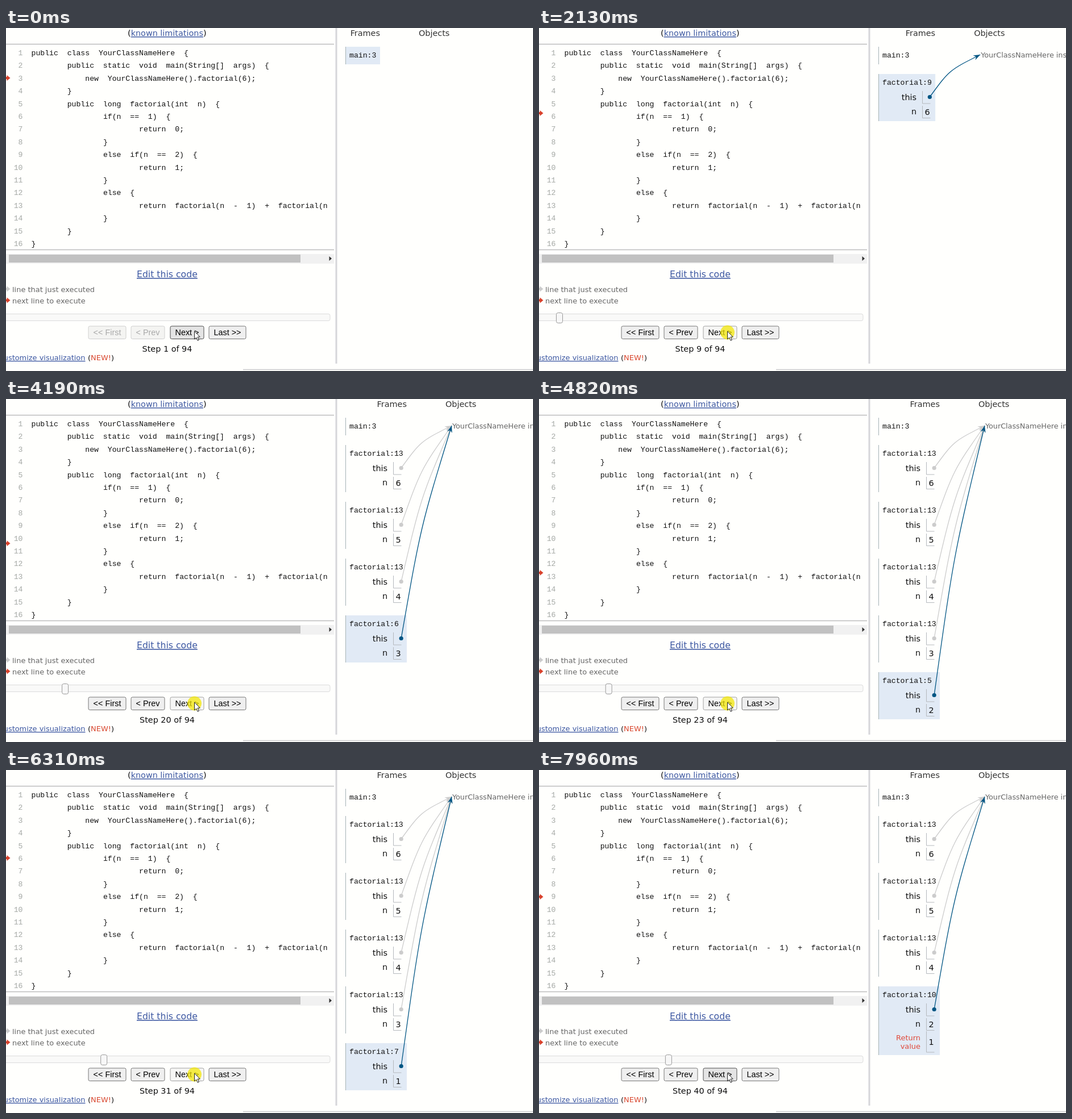
An HTML page for the animation above (8 s loop, 927 px wide and 604 px high).

```html
<!DOCTYPE html>
<html lang="en">
<head>
<meta charset="utf-8">
<title>Stepping through a recursive call</title>
<style>
  html, body { margin: 0; height: 100%; overflow: hidden; background: #fffffd; }
  svg { display: block; }
  text { font: 14.4px "DejaVu Sans", sans-serif; fill: #111; }
  .small { font-size: 12.95px; }
  .grey { fill: #666; }
  .head { fill: #333; }
  .link { fill: #3d58a2; text-decoration: underline; }
  .red { fill: #d9482f; }
  .ret { font-size: 12.95px; fill: #e04a3c; }
  .mono { font: 13.17px "Liberation Mono", monospace; }
  .num { fill: #a5a9a5; }
  .btn rect { fill: #efefef; stroke: #767676; }
  .btn text { font: 14.4px "Liberation Sans", sans-serif; fill: #000; }
  .off rect { fill: #f4f4f2; stroke: #cfcfcf; }
  .off text { fill: #a9a9a9; }
  .hover rect { fill: #e4e4e4; stroke: #4c4c4c; }
  .down rect { fill: #f6f6f5; stroke: #a0a0a0; }
  .end { text-anchor: end; }
  .mid { text-anchor: middle; }
</style>
</head>
<body>
<svg width="927" height="604" viewBox="0 0 927 604">
  <defs><path id="arrow" d="M-11-2H1.5V-5L7.5 0 1.5 5V2H-11z"/></defs>
  <text x="214" y="14">(<tspan class="link">known limitations</tspan>)</text>
  <path d="M0 28.5H577M0 390.5H577" stroke="#bdbdbd" stroke-width="1.5"/>
  <path d="M581 0V591" stroke="#d6d6da" stroke-width="3"/>
  <path id="foot" d="M417 601.5H927" stroke="#c9c9cc" stroke-width="1.5"/>
  <g id="code"></g>
  <path d="M0 398H577V415H0z" fill="#f1f1f1"/>
  <path d="M5 399H518V413H5z" fill="#c1c1c1"/>
  <path d="M568.5 402V410L573 406z" fill="#333"/>
  <text x="230" y="439" class="link" style="font-size:15.7px">Edit this code</text>
  <use href="#arrow" y="459.5" fill="#ccc"/>
  <use href="#arrow" y="479.5" fill="#d9412b"/>
  <text x="11" y="464.5" class="small grey">line that just executed</text>
  <text x="11" y="484.5" class="small grey">next line to execute</text>
  <rect x="-20" y="503.5" width="590" height="12" rx="3" fill="#f9f9f8" stroke="#dcdcdc"/>
  <rect id="knob" y="501.5" width="11" height="18" rx="3" fill="#f7f7f7" stroke="#999"/>
  <g id="buttons"></g>
  <text id="count" x="283.5" y="569.5" class="mid"></text>
  <text x="139.5" y="585" class="small link end">Customize visualization</text>
  <text x="144" y="585" class="small">(<tspan class="red">NEW!</tspan>)</text>
  <g id="stack"></g>
  <use id="marker" href="#arrow" fill="#d9412b"/>
  <circle id="glow" cx="331.5" cy="536" r="12.5" fill="#f2e600" opacity=".72"/>
  <path d="M331.5 534v14l3.2-3 2.4 5.4 2.3-1-2.4-5.3h4.3z" fill="#fff" stroke="#222"/>
</svg>
<script>
const $ = id => document.getElementById(id);
const esc = s => String(s).replace(/</g, '&lt;');
const text = (x, y, cls, s) => `<text x="${x}" y="${y}" class="${cls}">${esc(s)}</text>`;

const source = `public class YourClassNameHere {
8public static void main(String[] args) {
12new YourClassNameHere().factorial(6);
8}
8public long factorial(int n) {
16if(n == 1) {
24return 0;
16}
16else if(n == 2) {
24return 1;
16}
16else {
24return factorial(n - 1) + factorial(n
16}
8}
}`;
// Each line starts with its column; every space is two cells wide.
$('code').innerHTML = source.split('\n').map((line, i) => {
  const [, col, code] = line.match(/^(\d*)(.*)$/), y = 48 + 22.4 * i;
  return text(29.5, y, 'mono num end', i + 1) +
    text(44.5 + 7.9 * col, y, 'mono', code.replace(/ /g, '\u00a0\u00a0'));
}).join('');

$('buttons').innerHTML = [['<< First', 145, 66], ['< Prev', 220, 59], ['Next >', 289, 59], ['Last >>', 357, 65]]
  .map(([label, x, w]) => `<g class="btn"><rect x="${x - .5 + .5}" y="525" width="${w}" height="22.5" rx="2.5"/>` +
    text(x + w / 2, 540.5, 'mid', label) + '</g>').join('');
const buttons = $('buttons').children;

// Record the program's states by running it.
const steps = [null], stack = [];
const snap = () => steps.push(stack.map(f => ({ ...f })));
const at = line => { stack[stack.length - 1].line = line; snap(); };
const leave = value => { stack[stack.length - 1].ret = value; snap(); stack.pop(); return value; };
function factorial(n) {
  stack.push({ name: 'factorial', n });
  at(5); at(6);
  if (n == 1) { at(7); return leave(0); }
  at(9);
  if (n == 2) { at(10); return leave(1); }
  at(13);
  const a = factorial(n - 1); snap();
  const b = factorial(n - 2); snap();
  return leave(a + b);
}
stack.push({ name: 'main' });
at(3); at(3);
stack.push({ name: '<init>' });
at(1); at(1); leave('void');
snap();
factorial(6);

function pointer(x1, y1, x2, y2, color) {
  const cx = (x1 + x2) / 2 - 10, cy = (y1 + y2) / 2 - 10;
  const turn = Math.atan2(y2 - cy, x2 - cx) * 180 / Math.PI;
  return `<path d="M${x1} ${y1}C${cx} ${cy} ${cx} ${cy} ${x2} ${y2}" fill="none" stroke="${color}" stroke-width="1.3"/>
    <circle cx="${x1}" cy="${y1}" r="3.6" fill="${color}"/>
    <path d="M0 0L-12-4.5-8 0-12 4.5z" fill="${color}" transform="translate(${x2} ${y2})rotate(${turn})"/>`;
}

function drawStack(frames) {
  const titles = frames.map(f => f.name + ':' + f.line);
  const isVoid = frames.some(f => f.ret === 'void');
  const boxW = isVoid ? 36 : 14;
  const right = Math.max(611 + 7.83 * Math.max(...titles.map(s => s.length)), isVoid ? 700 : 0);
  const left = Math.round(right - 23.5 + 14 - boxW) + .5;
  const cell = (y, h, value) => `<path d="M${left} ${y}v${h}h${boxW}" fill="none" stroke="#b5b9bd"/>` +
    text(left + boxW / 2 + 1.5, y + h / 2 + 5.5, 'mid', value);
  const label = (y, cls, s) => text(left - 10.5, y, 'end ' + cls, s);
  let html = text(right, 14, 'head end', 'Frames') + text(right + 68, 14, 'head', 'Objects');
  let arrows = '';
  frames.forEach((f, i) => {
    const top = i ? 100 * i - 19 : 33, active = i == frames.length - 1;
    let body = '', y = top + 30;
    if (i) {
      body += label(y + 16, '', 'this') + cell(y, 22, '');
      arrows += pointer(right - 9.8, top + 40.5, right + 79, 47, active ? '#005583' : '#ccc');
      y += 26;
      if (f.n) { body += label(y + 15, '', 'n') + cell(y, 21.5, f.n); y += 25; }
      if (f.ret !== undefined) {
        body += label(y + 14, 'ret', 'Return') + label(y + 29, 'ret', 'value') + cell(y - 2, 37, f.ret);
        y += 38;
      }
      y += 2;
    } else y += 1;
    if (active) html += `<rect x="597" y="${top}" width="${right - 597}" height="${y - top}" fill="#e1eaf5"/>`;
    html += `<path d="M597.5 ${top}V${y}" stroke="#a6b3b6"/>` + text(604, top + 19, 'mono', titles[i]) + body;
  });
  if (arrows) html += text(right + 80, 51.5, 'grey" style="font-size:12.75px', 'YourClassNameHere instance') + arrows;
  $('stack').innerHTML = html;
}

// Clicking pace: [step, start in ms], linear in between.
const pace = [[1, 0], [2, 280], [3, 780], [4, 1000], [8, 1827], [15, 3080], [19, 3913], [26, 5240], [31, 6135], [40, 7945], [41, 8146]];
function startOf(step) {
  const i = Math.max(1, pace.findIndex(p => p[0] >= step));
  const [a, ta] = pace[i - 1], [b, tb] = pace[i];
  return ta + (tb - ta) * (step - a) / (b - a);
}
const ease = u => u < .5 ? 4 * u ** 3 : 1 - 4 * (1 - u) ** 3;
const lineOf = step => steps[step].at(-1).line;

// The marker starts late and is redirected whenever the next move begins.
function markerY(t) {
  const LAG = 175;
  let line = 3;
  for (let s = 2; s <= 40 && startOf(s) + LAG < t; s++) {
    const end = Math.min(t, startOf(s + 1) + LAG);
    line += (lineOf(s) - line) * ease(Math.min(1, (end - startOf(s) - LAG) / 200));
  }
  return 88 + 22.4 * (line - 3);
}

const TICK = 78.86;
const tick = t => t < 1020 ? [780, 550, 310, 150, 0].find(v => v <= t)
  : 1020 + Math.floor((t - 1020) / TICK + .05) * TICK;

let shown = 0;
function draw(now) {
  const t = tick(now % 8000);
  let step = 1;
  while (step < 40 && startOf(step + 1) <= t) step++;
  const down = startOf(step + 1) - t <= 131;
  if (step != shown) {
    shown = step;
    const frames = steps[step];
    drawStack(frames);
    $('count').textContent = `Step ${step} of 94`;
    $('knob').setAttribute('x', 30.5 + 6.19 * (step - 9));
    $('foot').style.display = frames.length > 5 && frames[5].ret !== undefined ? 'none' : '';
    for (const i of [0, 1]) buttons[i].setAttribute('class', step == 1 ? 'btn off' : 'btn');
  }
  buttons[2].setAttribute('class', down ? 'btn down' : 'btn hover');
  $('glow').style.display = down ? '' : 'none';
  $('marker').setAttribute('y', markerY(t));
  requestAnimationFrame(draw);
}
const begin = performance.now();
draw(0);
function loop() { return performance.now() - begin; }
</script>
</body>
</html>
```
